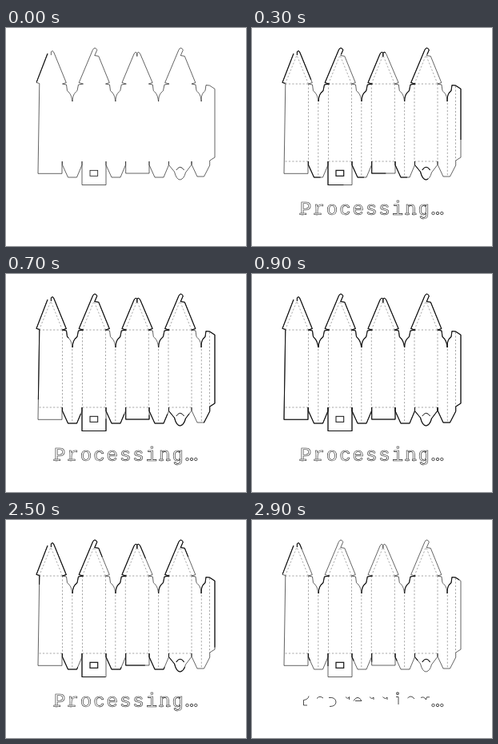
Recreate the animation shown at these times as an HTML page. Size 300 px wide and 273 px high, loop 3 s.

```html
<!DOCTYPE html>
<html lang="en">
<head>
<meta charset="utf-8">
<title>Processing</title>
<style>
html, body { margin: 0; width: 100%; height: 100%; overflow: hidden; background: #fff; }
svg { display: block; width: 300px; height: 273px; }
path, rect, circle { fill: none; stroke: #111; }
#folds path { stroke: #777; stroke-width: .65; stroke-dasharray: 2.2 2.2; }
#thin path { stroke: #222; stroke-width: .7; }
#bold path { stroke-width: 1.05; stroke-linejoin: round; }
text { font: 24px "Courier New", "Liberation Mono", monospace; letter-spacing: 1.98px; stroke: #222; stroke-width: .6; fill: #fff; }
#word .ink { stroke: #222; stroke-width: 2.3; }
#word .paper { stroke: #fff; stroke-width: 1.1; }
#trace text { fill: none; stroke-dasharray: 38 300; }
#dots circle, #hints path { stroke-width: .75; }
</style>
</head>
<body>
<svg viewBox="0 0 300 273">
  <g id="folds"></g>
  <g id="thin"></g>
  <g id="bold"></g>
  <rect id="window" x="105" y="178.3" width="9.7" height="7"/>
  <path id="arch" d="M212.8 178Q217.7 170.5 222.6 178"/>
  <g id="word">
    <text x="60" y="234">Processing</text>
    <path class="ink" d="M59.5 232.9h8.5M77.5 232.9h9M191.4 232.9h5.2M200 232.9h5.4"/>
    <path class="paper" d="M60.1 232.9h7.3M78.1 232.9h7.8M192 232.9h4M200.6 232.9h4.2"/>
  </g>
  <g id="trace"><text x="60" y="234" aria-hidden="true">Processing</text></g>
  <g id="hints">
    <path d="M71 220.5Q70 225 64.5 225.5V232H69"/>
    <path d="M81 223.5L83.5 221.5Q86 220.5 89 223"/>
    <path d="M96 222.5Q104.5 221.5 105 228Q104.5 233.5 97 233.5"/>
    <path d="M117 221.5Q120 225 121.5 221.5V225"/>
    <path d="M127 226.5Q132 218 137 226.5H129"/>
    <path d="M147 221.5Q150 225 152 222V225M163.5 221.5Q166.5 225 169 222V225"/>
    <path d="M180.8 216h2.4v2.4h-2.4zM180 221.5H183V231"/>
    <path d="M194.5 223Q199 218.5 203 224M211 222.5Q215 220.5 217.5 225L218.5 221.8H222"/>
  </g>
  <g id="dots"><circle cx="226.5" cy="232" r="1.7"/><circle cx="232" cy="232" r="1.7"/><circle cx="237.3" cy="232" r="1.7"/></g>
</svg>
<script>
const $ = id => document.getElementById(id);
const add = (group, d) => {
  const path = document.createElementNS("http://www.w3.org/2000/svg", "path");
  path.setAttribute("d", d);
  return $(group).appendChild(path);
};

const centers = [56, 110, 163.8, 217.5];

// Roof halves, relative to the tower centre
const rise = c => `M${c - 26.8} 92C${c - 26.8} 85 ${c - 25} 82 ${c - 21} 78.5L${c - 19.5} 71L${c - 13.5} 70L${c - 18.8} 68.5`;
const fall = c => `L${c + 19.3} 68.5L${c + 14.5} 70L${c + 19.5} 71L${c + 20.5} 78.5C${c + 24.5} 82 ${c + 26} 85 ${c + 26.8} 92`;
const hook = c => `L${c - 1.6} 27.5Q${c + 1} 22.5 ${c + 3.8} 27.5L${c + .8} 34.5L${c + 5.8} 35.3`;
const notch = c => `L${c - 4} 33Q${c - 2} 28.5 ${c} 31.5V35.5V31.5Q${c + 2} 28.5 ${c + 4.2} 33`;
const flap = x => `M${x} 167V171.5L${x + 7} 187H${x + 18}L${x + 24.5} 171.5V167`;

const edge = "M52 32L38 68.3L41.8 69.5L40 182.3H70V167";
const outlines = [
  edge,
  `M56.4 34V30Q58.2 27 60 31${fall(56)}`,
  rise(110) + hook(110) + fall(110),
  rise(163.8) + notch(163.8) + fall(163.8),
  rise(217.5) + hook(217.5) + fall(217.5),
  "M244 92C244 85 245 82 249 78.5L250 71.5L254.5 72L261 76.3V162L254.7 166V172L247.5 186H239L232.3 171.5V167",
  flap(70.5), flap(125), flap(179),
  "M95 167V196.5H125V167",
  "M149.7 167V182H179V167",
  "M203.5 167V171.5L210.5 180Q213 190 217.7 190Q222.5 189 224.5 181L231.7 171.5V167"
];

for (const c of centers) {
  const l = c - 14.5, r = c + 14.5;
  add("folds", `M${l} 70H${r}M${l} 167H${r}`);
  add("folds", `M${l} 70L${c} 34M${r} 70L${c} 34`);
  if (c > 60) add("folds", `M${l} 70V167`);
  add("folds", `M${r} 70V167`);
  add("folds", `M${c + 26.8} 94V186`);
}
add("folds", "M254.5 73V166");

const strokes = outlines.map(d => {
  add("thin", d);
  const path = add("bold", d);
  return { path, size: path.getTotalLength(), isEdge: d === edge };
});

// Per 100 ms: left edge drawn, other outlines drawn, window line width
const steps = [
  [.19, 0, .8], [.19, .18, 1.2], [.2, .4, 1.2], [.21, .55, 1.2], [.23, .6, 1.2],
  [.27, .66, 1.2], [.42, .74, 1.1], [.65, .84, 1], [.88, .94, 1], [1, 1, 1]
];
const show = (id, on) => { $(id).style.display = on ? "" : "none"; };

function draw(ms) {
  const tick = Math.floor((ms % 3000) / 100);
  const k = Math.min(tick, 30 - tick, 9);
  const [left, rest, width] = steps[k];
  for (const { path, size, isEdge } of strokes) {
    const part = isEdge ? left : rest;
    path.style.display = part ? "" : "none";
    path.style.strokeDasharray = `${part * size} ${size + 1}`;
  }
  $("window").style.strokeWidth = width;
  $("arch").style.strokeWidth = width;
  show("folds", k > 0);
  show("dots", k > 0);
  show("hints", k === 1);
  show("trace", k === 2);
  show("word", k > 2);
}

const start = performance.now();
function frame() {
  draw(performance.now() - start);
  requestAnimationFrame(frame);
}
draw(0);
requestAnimationFrame(frame);
</script>
</body>
</html>
```
